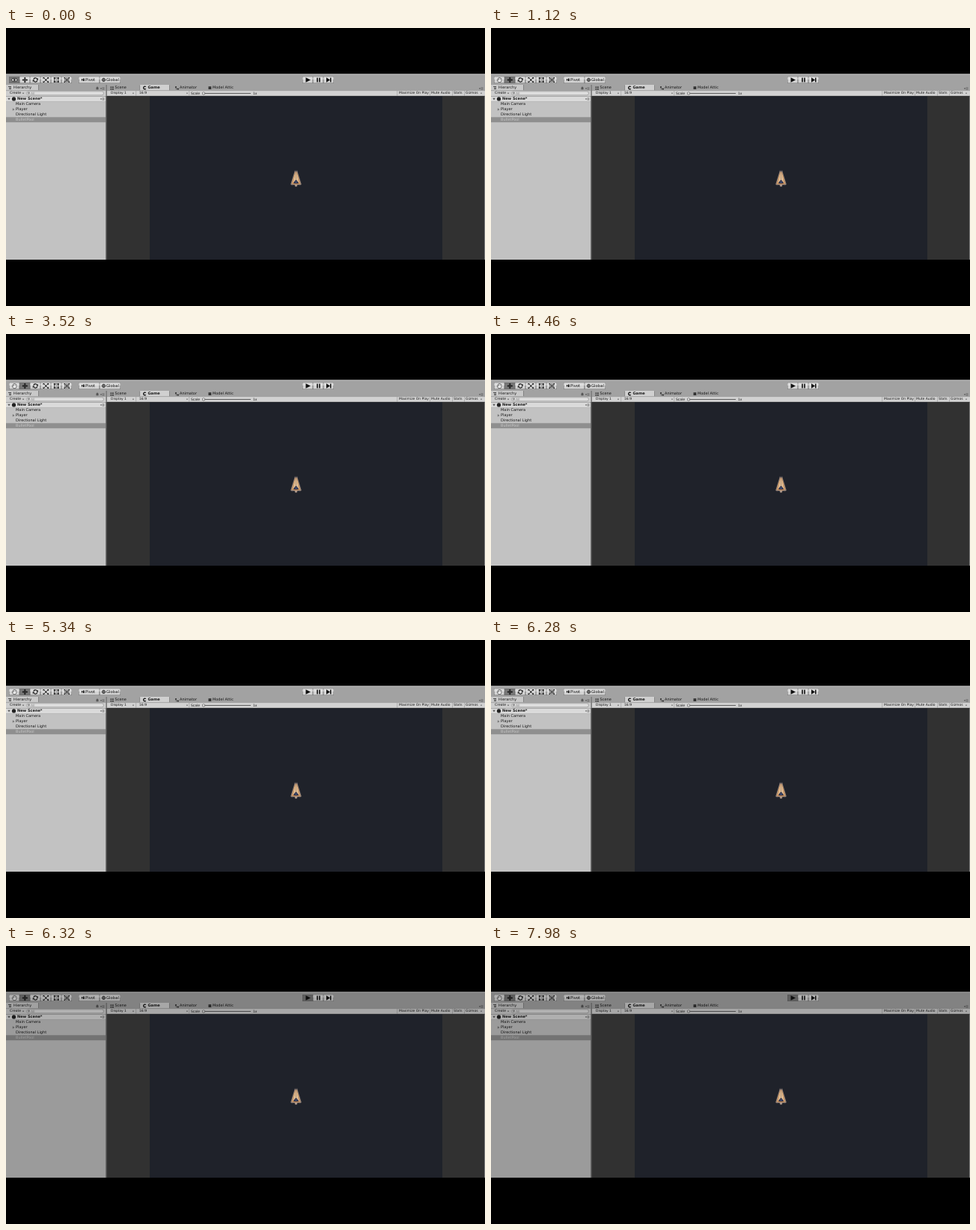
These frames come from a looping animation (640 px wide and 372 px high, 8000 ms). An HTML page with a canvas:

```html
<!DOCTYPE html>
<html lang="en">
<head>
<meta charset="utf-8">
<title>Editor</title>
<style>
html, body { margin: 0; width: 100%; height: 100%; overflow: hidden; background: #000; }
canvas { display: block; width: 640px; height: 372px; }
</style>
</head>
<body>
<canvas id="stage" width="640" height="372"></canvas>
<script>
const ctx = document.getElementById('stage').getContext('2d');
const LOOP = 8000, TOOL_AT = 580, TINT_LIST_AT = 6300, PLAY_AT = 6320;
const INK = '#161616';

function rect(x, y, w, h, color) {
  ctx.fillStyle = color;
  ctx.fillRect(x, y, w, h);
}

function text(str, x, y, size = 5, color = INK, weight = '') {
  ctx.font = `${weight} ${size}px "DejaVu Sans", sans-serif`;
  ctx.textBaseline = 'middle';
  ctx.fillStyle = color;
  ctx.fillText(str, x, y);
}

function poly(points, color) {
  ctx.beginPath();
  points.forEach(([x, y]) => ctx.lineTo(x, y));
  ctx.closePath();
  ctx.fillStyle = color;
  ctx.fill();
}

function line(points, color = INK, width = 1) {
  ctx.beginPath();
  points.forEach(([x, y], i) => i ? ctx.lineTo(x, y) : ctx.moveTo(x, y));
  ctx.strokeStyle = color;
  ctx.lineWidth = width;
  ctx.stroke();
}

function dot(x, y, r, color) {
  ctx.beginPath();
  ctx.arc(x, y, r, 0, Math.PI * 2);
  ctx.fillStyle = color;
  ctx.fill();
}

function ring(x, y, r, from = 0, to = Math.PI * 2, width = 1) {
  ctx.beginPath();
  ctx.arc(x, y, r, from, to);
  ctx.strokeStyle = INK;
  ctx.lineWidth = width;
  ctx.stroke();
}

function arrowDown(x, y, s = 1.3, color = '#333') {
  poly([[x - s, y - s / 2], [x + s, y - s / 2], [x, y + s]], color);
}

function button(x, w, down) {
  rect(x, 65, w, 9, '#686868');
  rect(x + .5, 65.5, w - 1, 8, down ? '#777' : '#d4d4d4');
  if (!down) rect(x + .5, 65.5, w - 1, 3.5, '#dedede');
}

function eyeIcon(x, y) {
  ctx.beginPath();
  ctx.ellipse(x, y, 3.8, 2.1, 0, 0, Math.PI * 2);
  ctx.fillStyle = '#e4e4e4';
  ctx.fill();
  ctx.strokeStyle = INK;
  ctx.lineWidth = .8;
  ctx.stroke();
  dot(x, y, 1.3, INK);
}

function handIcon(x, y) {
  poly([[x - 1.6, y + 3], [x - 3.3, y], [x - 2.6, y - .5], [x - 1.6, y + .4],
    [x - 1.7, y - 2.4], [x - .5, y - 3], [x + 1, y - 2.8], [x + 2.6, y - 1.8],
    [x + 2.7, y + 1], [x + 1.8, y + 3]], '#eee');
  ctx.strokeStyle = '#444';
  ctx.lineWidth = .7;
  ctx.stroke();
  line([[x - .4, y - 2.6], [x - .4, y]], '#777', .5);
  line([[x + 1, y - 2.4], [x + 1, y]], '#777', .5);
}

function moveIcon(x, y) {
  line([[x - 3.2, y], [x + 3.2, y]], INK, 1.2);
  line([[x, y - 3.2], [x, y + 3.2]], INK, 1.2);
  for (const s of [-1, 1]) {
    poly([[x + s * 3.8, y], [x + s * 2, y - 1.6], [x + s * 2, y + 1.6]], INK);
    poly([[x, y + s * 3.8], [x - 1.6, y + s * 2], [x + 1.6, y + s * 2]], INK);
  }
}

function rotateIcon(x, y) {
  ring(x, y, 2.6, .3, 2.7, 1.2);
  ring(x, y, 2.6, 3.45, 5.85, 1.2);
  poly([[x + 3.7, y - 2.5], [x + 3.5, y + .3], [x + 1.1, y - .5]], INK);
  poly([[x - 3.7, y + 2.5], [x - 3.5, y - .3], [x - 1.1, y + .5]], INK);
}

function scaleIcon(x, y) {
  for (const sx of [-1, 1]) for (const sy of [-1, 1]) {
    line([[x + sx, y + sy], [x + sx * 3, y + sy * 3]], INK, 1);
    poly([[x + sx * 3.8, y + sy * 3.4], [x + sx * 1.5, y + sy * 3.4], [x + sx * 3.8, y + sy * 1.3]], INK);
  }
  rect(x - 1, y - 1, 2, 2, INK);
}

function rectIcon(x, y) {
  ctx.strokeStyle = INK;
  ctx.lineWidth = .8;
  ctx.strokeRect(x - 2.5, y - 2.5, 5, 5);
  for (const sx of [-1, 1]) for (const sy of [-1, 1]) dot(x + sx * 2.6, y + sy * 2.6, 1, INK);
  dot(x, y, .6, INK);
}

function transformIcon(x, y) {
  ring(x, y, 2.6, 0, Math.PI * 2, .7);
  for (const sx of [-1, 1]) {
    for (const sy of [-1, 1]) rect(x + sx * 2.9 - .8, y + sy * 2.7 - .8, 1.6, 1.6, INK);
  }
  line([[x - 1.7, y], [x + 1.7, y]], INK, .9);
  line([[x, y - 1.7], [x, y + 1.7]], INK, .9);
}

function menuIcon(x, y) {
  arrowDown(x, y, 1);
  for (let i = -1; i < 2; i++) line([[x + 1.5, y + i * 1.2], [x + 4.5, y + i * 1.2]], '#555', .6);
}

function toolbar(eyeMode, playing) {
  rect(0, 61.5, 640, 14.5, '#a2a2a2');
  rect(0, 61.5, 640, 1, '#bdbdbd');
  const icons = [eyeMode ? eyeIcon : handIcon, moveIcon, rotateIcon, scaleIcon, rectIcon, transformIcon];
  icons.forEach((icon, i) => {
    button(4 + i * 14, 14, i === (eyeMode ? 0 : 1));
    icon(11.3 + i * 14, 69.5);
  });
  button(97, 28);
  button(125, 28);
  rect(101, 68, 1.3, 2.5, INK);
  rect(103, 67.5, 1.7, 3.5, INK);
  text('Pivot', 106, 69.6, 5.4);
  ring(130.5, 69.4, 2.1, 0, Math.PI * 2, .9);
  line([[128.5, 69.4], [132.5, 69.4]], INK, .6);
  line([[130.5, 67.4], [130.5, 71.4]], INK, .6);
  text('Global', 134, 69.6, 5.3);
  button(396, 14, playing);
  button(410, 14);
  button(424, 14);
  poly([[400.5, 66.3], [407, 69.5], [400.5, 72.7]], '#111');
  rect(415.2, 66.6, 1.6, 5.8, '#111');
  rect(418.2, 66.6, 1.6, 5.8, '#111');
  poly([[428, 66.3], [433, 69.5], [428, 72.7]], '#111');
  rect(433, 66.6, 1.5, 5.8, '#111');
}

function hierarchy() {
  rect(0, 76, 135, 234, '#a2a2a2');
  rect(0, 76, 43, 8, '#c9c9c9');
  rect(43, 76, .7, 7, '#787878');
  for (let i = 0; i < 3; i++) rect(3 + (i ? 1 : 0), 78 + i * 1.6, 4 - (i ? 1 : 0), .8, '#333');
  text('Hierarchy', 10, 80, 5);
  rect(120.5, 80, 3, 2.3, '#555');
  ring(122, 80, 1, Math.PI, 0, .6);
  menuIcon(127, 81);

  rect(0, 83.5, 133.5, 7.5, '#cdcdcd');
  rect(0, 83.5, 133.5, .6, '#858585');
  text('Create', 5, 87.3, 4.5);
  arrowDown(23, 87.3, 1);
  ctx.beginPath();
  ctx.roundRect(27.5, 84.8, 103, 5, 2.5);
  ctx.fillStyle = '#dedede';
  ctx.fill();
  ctx.strokeStyle = '#8a8a8a';
  ctx.lineWidth = .6;
  ctx.stroke();
  ring(30.5, 87, 1, 0, Math.PI * 2, .5);
  text('All', 33, 87.4, 4.5, '#8a8a8a');

  rect(0, 91, 133.5, 219, '#c2c2c2');
  rect(0, 91, 133.5, 7.3, '#dadada');
  rect(0, 91, 133.5, .6, '#858585');
  rect(0, 98, 133.5, .5, '#a8a8a8');
  arrowDown(4, 94.7, 1.7, '#555');
  dot(10.5, 94.9, 2.6, '#222');
  text('New Scene*', 15, 95, 5, INK, 'bold');
  menuIcon(127, 95);

  rect(0, 119.3, 133.5, 6.9, '#8f8f8f');
  ['Main Camera', 'Player', 'Directional Light', 'BulletPool'].forEach((name, i) =>
    text(name, 13, 102.1 + i * 7, 5, i === 3 ? '#c6c6c6' : INK));
  poly([[8.8, 107.2], [11.6, 109], [8.8, 110.8]], '#777');
  rect(133.5, 76, 1.7, 234, '#7a7a7a');
  rect(133.5, 91, 1.7, 219, '#4c4c4c');
}

function gameHeader() {
  rect(135, 76, 505, 8, '#a2a2a2');
  rect(179, 76, 39, 8, '#d0d0d0');
  rect(178.5, 76.5, .6, 7, '#777');
  rect(218, 76.5, .6, 7, '#777');
  for (const [x, y] of [[139.5, 78.5], [142, 78.5], [139.5, 81], [142, 81]]) rect(x, y, 1.8, 1.6, '#333');
  text('Scene', 145.5, 80.2, 5);
  ring(185.5, 80, 1.8, .8, 5.5, 1.3);
  text('Game', 189.5, 80.2, 5, INK, 'bold');
  rect(226, 78.2, 2, 1.7, '#333');
  rect(228.5, 80.7, 2.5, 1.7, '#333');
  line([[227, 79], [227, 81.5], [229, 81.5]], '#333', .5);
  text('Animator', 232, 80.2, 5);
  rect(270.5, 78.2, 3.8, 3.8, '#333');
  text('Model Attic', 276, 80.2, 5);
  menuIcon(633, 81);

  rect(135, 83.5, 505, 7.6, '#d2d2d2');
  rect(135, 83.5, 505, .6, '#858585');
  rect(135, 90.7, 505, .5, '#777');
  text('Display 1', 140, 87.3, 4.5);
  arrowDown(170, 87.3, .9);
  text('16:9', 178, 87.3, 4.5);
  arrowDown(242, 87.3, .9);
  text('Scale', 247, 87.6, 4.5);
  rect(264, 87, 63, 1, '#5c5c5c');
  dot(264, 87.5, 2, '#555');
  dot(264, 87.5, 1.4, '#d8d8d8');
  text('1x', 330, 87.6, 4.5);
  for (const x of [173.5, 244.5, 522.5, 566, 596, 612]) rect(x, 84, .6, 7, '#969696');
  text('Maximize On Play', 525, 87.3, 4.5);
  text('Mute Audio', 568, 87.3, 4.5);
  text('Stats', 598, 87.3, 4.5);
  text('Gizmos', 614, 87.3, 4.5);
  arrowDown(635, 87.3, .9);
}

function ship(x, y) {
  ctx.save();
  ctx.translate(x, y);
  poly([[-1.4, -11], [0, -9], [1.4, -11], [7.3, 8], [5.8, 9], [2, 8.6],
    [1.2, 11], [-1.2, 11], [-2, 8.6], [-5.8, 9], [-7.3, 8]], '#8f8079');
  poly([[-1.1, -9], [0, -7.5], [1.1, -9], [6, 7.3], [2, 8], [-2, 8], [-6, 7.3]], '#bd8756');
  poly([[-.8, -8], [.8, -8], [3.6, 6], [-3.6, 6]], '#dfc09a');
  line([[-1.5, -5], [-5, 7]], '#e0b27d', .8);
  line([[1.5, -5], [5, 7]], '#e0b27d', .8);
  line([[0, -9], [0, 2]], '#9b7658', .6);
  poly([[-3.5, 6], [-1.4, 3.2], [0, 1.8], [1.4, 3.2], [3.5, 6], [2.2, 6.6], [-2.2, 6.6]], '#292d48');
  rect(-.8, 4.3, 1.6, 1.3, '#667dab');
  rect(-1, 8, 2, 2.5, '#b39c8b');
  ctx.restore();
}

function draw(t) {
  const playing = t >= PLAY_AT;
  const shade = 'rgba(0,0,0,.2)';
  rect(0, 0, 640, 372, '#000');
  toolbar(t < TOOL_AT, playing);
  hierarchy();
  gameHeader();
  if (t >= TINT_LIST_AT) rect(0, 76, 133.5, 234, shade);
  if (playing) {
    rect(0, 61.5, 640, 14.5, shade);
    rect(133.5, 76, 506.5, 15, shade);
  }
  rect(135, 91.2, 505, 218.8, '#313131');
  rect(192, 91.2, 391, 218.8, '#1f222a');
  rect(639, 91.2, 1, 218.8, '#777');
  ship(387.5, 201.3);
}

const start = performance.now();
function tick() {
  draw((performance.now() - start) % LOOP);
  requestAnimationFrame(tick);
}
tick();
</script>
</body>
</html>
```
